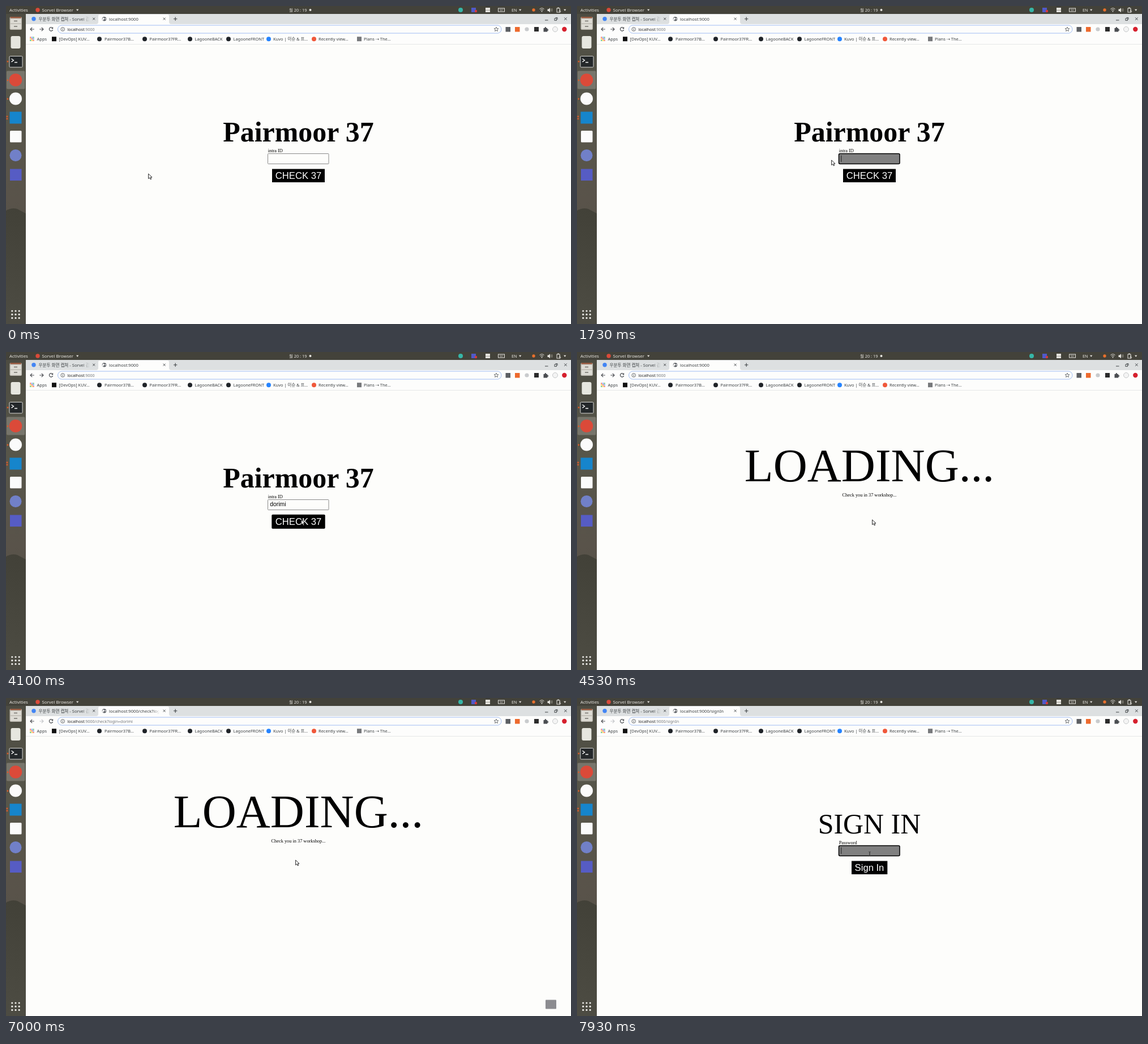
These frames come from a looping animation (998 by 561 pixels, 8 s). An HTML page:

```html
<!DOCTYPE html>
<html lang="en">
<head>
<meta charset="utf-8">
<title>Browser demo</title>
<style>
  html, body { margin: 0; width: 100%; height: 100%; overflow: hidden; background: #fdfdfb; }
  svg { display: block; width: 100vw; height: 100vh; }
  text { white-space: pre; }
  .ui { font-family: "Noto Sans", "Noto Sans CJK KR", "Noto Sans CJK", sans-serif; }
  .serif { font-family: "Liberation Serif", "Times New Roman", serif; }
  .sans { font-family: "Liberation Sans", Arial, sans-serif; }
</style>
</head>
<body>
<svg id="stage" viewBox="0 0 998 561" xmlns="http://www.w3.org/2000/svg"></svg>
<script>
const LOOP = 8000;
const USER = "dorimi";
const HOST = "localhost:9000";
const MID = 516.5;
const stage = document.getElementById("stage");

// Markup helpers
const rect = (x, y, w, h, fill, more = "") =>
  `<rect x="${x}" y="${y}" width="${w}" height="${h}" fill="${fill}" ${more}/>`;
const dot = (x, y, r, fill, more = "") =>
  `<circle cx="${x}" cy="${y}" r="${r}" fill="${fill}" ${more}/>`;
const line = (d, color, width = 1, more = "") =>
  `<path d="${d}" fill="none" stroke="${color}" stroke-width="${width}" ${more}/>`;
const shape = (d, fill, more = "") => `<path d="${d}" fill="${fill}" ${more}/>`;
const text = (x, y, size, str, fill = "#000", cls = "ui", more = "") =>
  `<text x="${x}" y="${y}" font-size="${size}" fill="${fill}" class="${cls}" ${more}>${str}</text>`;
const centered = (y, size, str, cls, fill = "#000", more = "") =>
  text(MID, y, size, str, fill, cls, `text-anchor="middle" ${more}`);
const group = (id, body) => `<g id="${id}">${body}</g>`;
const grid = (x, y, step, draw) =>
  Array.from({ length: 9 }, (_, i) => draw(x + (i % 3) * step, y + Math.floor(i / 3) * step, i)).join("");

function defs() {
  return `<defs>
    <linearGradient id="dockFill" x1="0" y1="0" x2="0" y2="1">
      <stop offset="0" stop-color="#4d4c42"/><stop offset=".3" stop-color="#57564a"/>
      <stop offset=".6" stop-color="#59534a"/><stop offset="1" stop-color="#504f45"/>
    </linearGradient>
    <linearGradient id="hillFill" x1="0" y1="0" x2="0" y2="1">
      <stop offset="0" stop-color="#424138"/><stop offset="1" stop-color="#4d4c43"/>
    </linearGradient>
    <linearGradient id="tabFade"><stop offset="0" stop-color="#dde0e1" stop-opacity="0"/>
      <stop offset="1" stop-color="#dde0e1"/></linearGradient>
    <linearGradient id="openFade"><stop offset="0" stop-color="#fdfdfc" stop-opacity="0"/>
      <stop offset="1" stop-color="#fdfdfc"/></linearGradient>
    <clipPath id="tabA"><rect x="50" y="14" width="98" height="18"/></clipPath>
    <clipPath id="tabB"><rect x="175" y="14" width="96" height="18"/></clipPath>
  </defs>`;
}

function topBar() {
  const pale = "#e6e4df";
  const label = (x, str, size = 7.4) => text(x, 9.6, size, str, pale, "ui", 'font-weight="500"');
  const arrow = x => shape(`M${x} 5.7h4.4l-2.2 3z`, pale);
  return rect(0, 0, 998, 14, "#43423a") +
    label(6, "Activities", 7.9) + dot(56, 7, 3.7, "#db4a39") + label(63.5, "Sorvel Browser", 7.9) + arrow(124) +
    label(500, "월 20 : 19") + dot(537.5, 7, 2, pale) +
    dot(803, 7, 4, "#36b6a8") +
    rect(822, 3, 8, 8, "#5059c9") + dot(830, 9, 2.2, "#d83b3b") +
    rect(847, 3, 8, 8, pale) + line("M847 7.5h8", "#8a8880", .7) +
    rect(869.5, 4, 11, 6, "none", `stroke="${pale}"`) + line("M871.5 6h7M872.5 8h5", pale, .9, 'stroke-dasharray="1 .6"') +
    label(893, "EN") + arrow(906) +
    dot(932, 7, 2.7, "#e9702c") +
    line("M942.5 5.5q4-3.5 8 0M944 7.4q2.5-2 5 0", pale, 1) + dot(946.5, 9.4, 1, pale) +
    shape("M956.5 5.5h2l2.5-2.3v8l-2.5-2.3h-2z", pale) + line("M962.3 5q1.6 2 0 4M964 4q2.4 3 0 6", "#aaa89f", .8) +
    rect(973, 4, 5, 7, "none", `stroke="${pale}"`) + rect(974.3, 2.5, 2.4, 1.5, pale) + line("M979 6l-2 3h3l-2 3", pale, .8) +
    arrow(985);
}

function dock() {
  const marks = [[3, 98], [3, 131], [3, 164], [2, 195], [2, 199]];
  return rect(0, 14, 35, 547, "url(#dockFill)") +
    shape("M0 361q10-6 20-3l15 8v195H0z", "url(#hillFill)") +
    rect(1, 114.5, 32.5, 32, "#77756b", 'rx="2"') +
    // file cabinet
    rect(6.5, 19, 21.5, 23, "#bdbab1", 'rx="2.5"') + rect(7.5, 19, 19.5, 2.6, "#9a5a40", 'rx="1.3"') +
    rect(8, 22.5, 18.5, 8, "#dedcd5") + rect(8, 32, 18.5, 8.5, "#dedcd5") +
    rect(14, 25.5, 6, 2, "#8d8b85") + rect(14, 35, 6, 2, "#8d8b85") +
    rect(8.5, 53, 17, 22, "#e6e6df", 'rx="3"') +
    // terminal
    rect(6, 88.5, 23, 19.5, "#24282a", 'rx="1.5" stroke="#d9d9d6"') +
    line("M9.5 93l4 2.8-4 2.8M15 99.5h5", "#fff", 1.3) +
    dot(17, 130.5, 11.3, "#db4a39") +
    dot(17, 163.5, 11, "#fbfbfb") +
    rect(6.5, 186.5, 21, 21, "#1685cc") +
    rect(7, 220, 20.5, 20.5, "#fbfbfb", 'rx="1.5"') +
    dot(17, 263.5, 10.5, "#7180c8") +
    rect(7, 287.5, 20.5, 20.5, "#565cc4") +
    marks.map(([x, y]) => dot(x, y, 1.4, "#dc5a2a")).join("") +
    grid(10.8, 538, 6.2, (x, y) => dot(x, y, 1.6, "#efeeea"));
}

function tabs() {
  const close = x => line(`M${x} 20.7l3.8 3.8m0-3.8l-3.8 3.8`, "#3c4043", 1);
  return rect(35, 14, 963, 18, "#dde0e1") +
    shape("M159 32q4 0 4-4v-10q0-3 3-3h119q3 0 3 3v10q0 4 4 4z", "#fdfdfc") +
    dot(49, 22.8, 3.7, "#4285f4") +
    `<g clip-path="url(#tabA)">${text(57.5, 25.5, 7.6, "우분투 화면 캡쳐 - Sorvel 검색", "#3c4043")}</g>` +
    rect(134, 16, 14, 15, "url(#tabFade)") + close(153.3) +
    dot(173.5, 22.8, 3.8, "#5f6368") + shape("M171 20.5l2.5.4.8 2-2.3 1-.2 2-1.8-2zM175 21l1.5 1-.3 2-1.2-.6z", "#fff") +
    `<g clip-path="url(#tabB)"><text id="tabTitle" x="182" y="25.5" font-size="7.65" fill="#3c4043" class="ui"></text></g>` +
    rect(259, 16, 12, 15, "url(#openFade)") + close(277.7) +
    line("M296 22.7h6.4M299.2 19.5v6.4", "#3c4043", 1.1) +
    line("M952 25h5.5", "#3c4043", 1) +
    rect(969, 22, 3.5, 3.5, "none", 'stroke="#3c4043" stroke-width=".9"') + line("M970.5 20.5h3.5v3.5", "#3c4043", .9) +
    line("M986.2 20.4l4.4 4.4m0-4.4l-4.4 4.4", "#3c4043", 1);
}

function toolbar() {
  const ink = "#4a4d51";
  return rect(35, 32, 963, 36, "#fdfdfc") +
    line("M49.7 41h-6.6m3.1-3.1L43 41l3.2 3.1", ink, 1.2) +
    line("M59.3 41h6.6m-3.1-3.1L66 41l-3.2 3.1", ink, 1.2, 'id="forward"') +
    line("M82.2 39a3.2 3.2 0 1 0 .4 3", ink, 1.2) + shape("M83.2 37v3.2H80z", ink) +
    rect(91.5, 34, 783.5, 14, "#fdfdfc", 'rx="7" stroke="#9fbcf3" stroke-width="1"') +
    dot(100.2, 41, 3.3, "none", `stroke="${ink}" stroke-width=".8"`) + line("M100.2 40.5v2.4M100.2 38.8v.9", ink, .9) +
    `<text x="108.5" y="43.6" font-size="7.1" fill="#202124" class="ui">localhost<tspan id="path" fill="#74787d"></tspan></text>` +
    shape("M866 37.2l1.1 2.5 2.7.2-2.1 1.8.7 2.7-2.4-1.5-2.4 1.5.7-2.7-2.1-1.8 2.7-.2z", "none", `stroke="${ink}" stroke-width=".8"`) +
    rect(882.5, 37, 8.5, 8.5, "#5c5f63") + rect(899, 37, 8.5, 8.5, "#ed6a2d") +
    dot(920, 41, 3.6, "#c9cbcd") + rect(933, 37, 8, 8, "#2b2b2b") +
    shape("M949.5 39h2q-.2-2 1.4-2t1.4 2h2v2q2 0 2 1.3t-2 1.4v1.8h-6.8z", ink) +
    dot(970, 41, 4.5, "#f4f4f4", 'stroke="#b9bbbd" stroke-width=".8"') +
    dot(986.3, 41, 4.2, "#d6202e");
}

function bookmarks() {
  const hues = ["#ea4335", "#4285f4", "#34a853", "#fbbc05"];
  const items = [
    [81, "[DevOps] KUV…", 93.5, "#111", "sq"],
    [161, "Pairmoor37B…", 174, "#1f2328"],
    [241, "Pairmoor37FR…", 253.5, "#1f2328"],
    [321, "LagooneBACK", 333.5, "#1f2328"],
    [389, "LagooneFRONT", 401.5, "#1f2328"],
    [460, "Kuvo | 이슈 &amp; 프…", 472, "#2684ff"],
    [540, "Recently view…", 552, "#f0583a"],
    [620, "Plans ⇢ The…", 632, "#77797c", "sq"]
  ];
  return grid(43.2, 55.4, 2.7, (x, y, i) => rect(x - .9, y - .9, 1.8, 1.8, hues[i % 4])) +
    text(54.5, 60.7, 7.5, "Apps", "#3c4043") +
    items.map(([x, str, tx, color, kind]) =>
      (kind ? rect(x, 54.2, 8, 8, color) : dot(x + 4, 58.2, 4, color)) + text(tx, 60.7, 7.45, str, "#3c4043")).join("") +
    line("M35 67.5h963", "#e6e7e7", 1);
}

const field = (id, label) =>
  text(462.7, 257.6, 8.32, label, "#000", "serif") +
  rect(462.5, 260.5, 107.5, 18, "#fff", `id="${id}"`);

function pages() {
  const button = (x, w, str, id) =>
    rect(x, 287.5, w, 23.5, "#000", `id="${id}"`) + centered(305.2, 16.64, str, "sans", "#fff");
  return group("home",
      centered(238.8, 49.9, "Pairmoor 37", "serif", "#000", 'font-weight="700"') +
      field("idField", "intra ID") +
      '<text id="typed" x="466.3" y="272.3" font-size="10.4" class="sans"></text>' +
      button(470, 93, "CHECK 37", "checkButton")) +
    group("loading",
      centered(228, 83.2, "LOADING...", "serif") +
      centered(254.7, 8.32, "Check you in 37 workshop...", "serif")) +
    group("signIn",
      centered(238.8, 49.9, "SIGN IN", "serif") +
      field("passField", "Password") +
      button(485, 63.3, "Sign In", "signButton")) +
    rect(0, 263.5, .9, 11.5, "#111", 'id="caret"') +
    rect(953, 532.5, 19, 16, "#8c8c90", 'id="flash" rx="1"');
}

const pointer =
  group("arrow", shape("M-.4 0v8.7l2.1-1.9 1.5 3.1 1.5-.7-1.5-3h2.8z", "#fff", 'stroke="#111" stroke-width=".9" stroke-linejoin="round"')) +
  group("beam", line("M-1.8-3.8q1.8 0 1.8 1v5.6q0 1-1.8 1M1.8-3.8q-1.8 0-1.8 1v5.6q0 1 1.8 1", "#333", .8));

stage.innerHTML = defs() + rect(0, 0, 998, 561, "#fdfdfb") + pages() + tabs() + toolbar() +
  bookmarks() + dock() + topBar() + group("pointer", pointer);

const el = {};
stage.querySelectorAll("[id]").forEach(n => el[n.id] = n);
const show = (node, on) => node.setAttribute("display", on ? "inline" : "none");
const set = (node, attrs) => Object.entries(attrs).forEach(([k, v]) => node.setAttribute(k, v));

// Pointer stops: time, x, y
const stops = [
  [0, 252, 296], [500, 252, 296], [600, 254, 296], [800, 256, 297], [1000, 406.5, 317],
  [1270, 470, 283], [1470, 480, 270], [1630, 480, 270], [1730, 450, 272],
  [3230, 450.5, 272], [3500, 484, 288], [3830, 522, 296], [4530, 522, 296],
  [5130, 508, 285], [5330, 508, 285], [5331, 512, 286], [7670, 512, 286], [7900, 517, 275], [8000, 517, 275]
];
const keys = [2030, 2100, 2170, 2230, 2370, 2500];

function pointerAt(t) {
  const i = Math.max(1, stops.findIndex(s => s[0] > t));
  const [a, b] = [stops[i - 1], stops[i]];
  const p = (t - a[0]) / (b[0] - a[0]);
  return [a[1] + (b[1] - a[1]) * p, a[2] + (b[2] - a[2]) * p];
}

function focusField(node, on) {
  set(node, on
    ? { fill: "#808080", stroke: "#000", "stroke-width": 1.5, rx: 2 }
    : { fill: "#fdfdfb", stroke: "#8a8a8a", "stroke-width": 1, rx: .8 });
}

function render(t) {
  const page = t < 4200 ? "home" : t < 7300 ? "loading" : "signIn";
  ["home", "loading", "signIn"].forEach(id => show(el[id], id === page));

  const route = t < 4800 ? "" : t < 7300 ? "/check?login=" + USER : "/signIn";
  el.tabTitle.textContent = HOST + route;
  el.path.textContent = ":9000" + route;
  el.forward.setAttribute("stroke", t < 4800 ? "#4a4d51" : "#c4c6c9");

  const typed = USER.slice(0, keys.filter(k => t >= k).length);
  el.typed.textContent = typed;
  focusField(el.idField, t >= 1470 && t < 4000);
  focusField(el.passField, t >= 7870);

  const pressed = t >= 4000;
  set(el.checkButton, pressed
    ? { x: 469.3, y: 286.8, width: 94.4, height: 24.9, rx: 1.8 }
    : { x: 470, y: 287.5, width: 93, height: 23.5, rx: 0 });

  const typing = t >= 1470 && t < 2630;
  show(el.caret, typing || t >= 7870);
  el.caret.setAttribute("x", 466.3 + (typing && typed ? el.typed.getComputedTextLength() : 0));

  const since = t >= 7000 ? t - 7000 : t - 4230;
  show(el.flash, since >= 0 && since < 70);
  el.flash.setAttribute("opacity", since < 30 ? 1 : .5);

  const [x, y] = pointerAt(t);
  const overField = page !== "loading" && x > 462 && x < 570 && y > 260 && y < 279;
  el.pointer.setAttribute("transform", `translate(${x.toFixed(2)} ${y.toFixed(2)})`);
  show(el.arrow, !overField);
  show(el.beam, overField);
}

const start = performance.now();
function tick() {
  render((performance.now() - start) % LOOP);
  requestAnimationFrame(tick);
}
tick();
</script>
</body>
</html>
```
